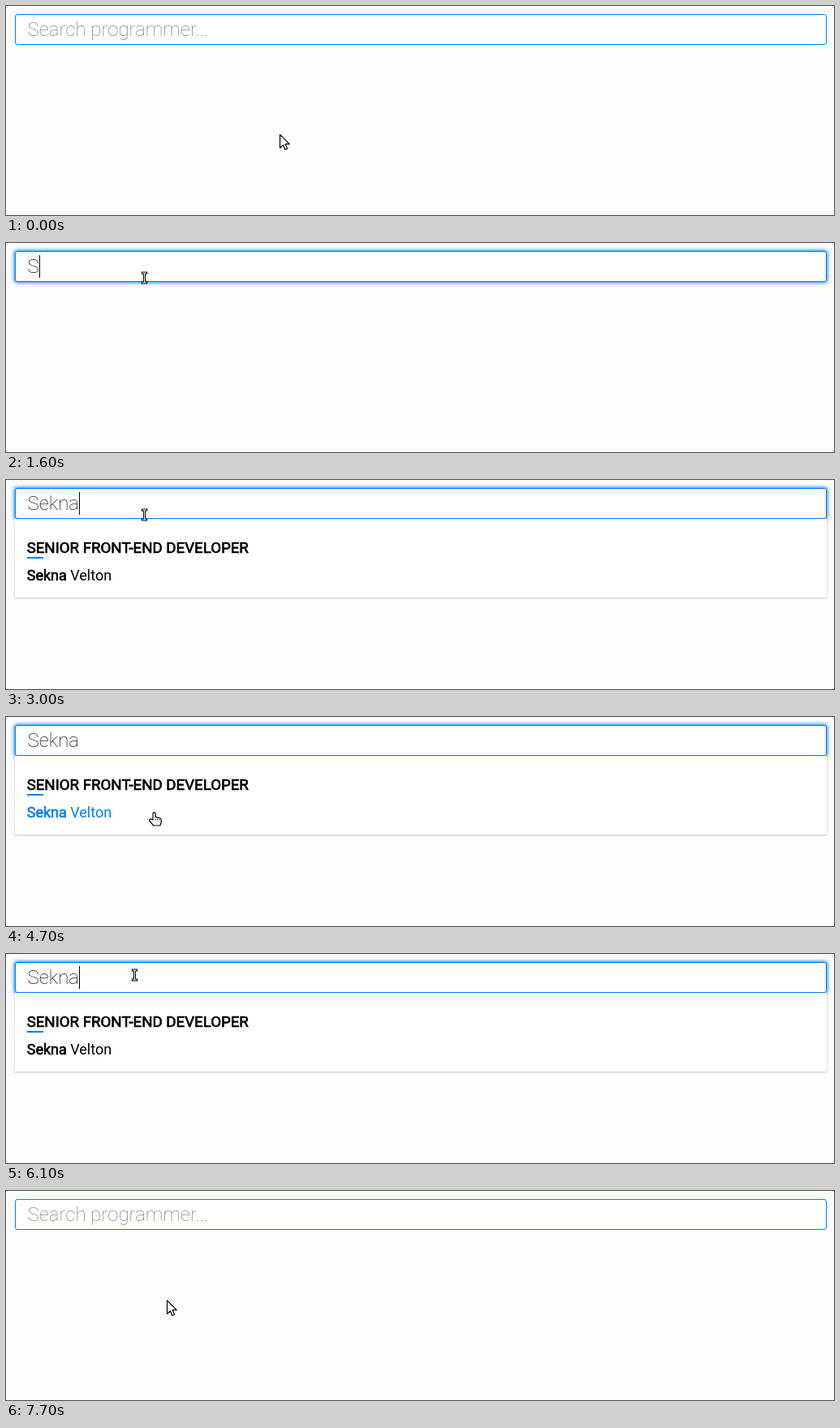
An HTML page that plays this animation: 1020x258 px, repeating every 8 s.

```html
<!DOCTYPE html>
<html lang="en">
<head>
<meta charset="utf-8">
<title>Programmer search</title>
<style>
  html, body { margin: 0; width: 100%; height: 100%; overflow: hidden; background: #fdfdfb; }
  #stage { position: relative; width: 1020px; height: 258px; overflow: hidden; }
  #field, #panel { position: absolute; left: 11px; width: 1000px; box-sizing: border-box; background: #fff; }
  #field { top: 10px; height: 38px; border: 1px solid #0081f0; border-radius: 3px; }
  #field.focus { box-shadow: 0 0 4px 1px #0081ff; }
  #panel { top: 48px; box-shadow: 0 1px 3px rgba(0, 0, 0, .22); }
  svg { position: absolute; left: 0; top: 0; }
  text { font-family: Roboto, sans-serif; font-size: 18px; fill: currentColor; white-space: pre; }
  #value { font-size: 24px; font-weight: 100; }
  .title { font-size: 14pt; }
  .title, .match { stroke: currentColor; stroke-width: .7px; }
  .hover { color: #0081f0; }
  .cursor { fill: #fff; stroke: #000; stroke-width: 1.2px; stroke-linejoin: round; }
</style>
</head>
<body>
<div id="stage">
  <div id="field"></div>
  <div id="panel"></div>
  <svg width="1020" height="258" viewBox="0 0 1020 258">
    <text id="value" x="26.5" y="37"></text>
    <rect id="caret" y="15" width="1" height="28"/>
    <g id="results"></g>
    <g id="pointer">
      <path id="arrow" class="cursor" d="M.5 .7V17.2L4.4 13.6L6.8 19.2L9.6 18L7.2 12.4H12.2Z"/>
      <g id="beam" fill="none">
        <path stroke="#000" stroke-width="3" d="M-3.7-6H3.7M-3.7 6H3.7M0-6V6"/>
        <path stroke="#fff" d="M-2.7-6H2.7M-2.7 6H2.7M0-6V6"/>
      </g>
      <g id="hand" transform="translate(-6 -1)">
        <path class="cursor" d="M5 10V2.5Q5 .8 6.6 .8T8.2 2.5V6.6L13 7.6Q15.2 8 15.2 10V13L13.8 17H5.8L.9 11.4Q0 9.2 2 8.9Z"/>
        <path stroke="#000" d="M8.3 9v1.5M10.6 9v1.5M12.9 9v1.5"/>
      </g>
    </g>
  </svg>
</div>
<script>
const LOOP = 8000, STEP = 100, ROW = 104, BLINK = 600, DELAY = 100;
const FOCUS = 800, PICK = 4800, REFOCUS = 6100, CLEARED = 7100, BLUR = 7700;
const TYPE = { start: 1600, every: 325 }, ERASE = { start: 6500, every: 100 };
const $ = id => document.getElementById(id);

const people = [
  ['SENIOR FRONT-END DEVELOPER', 'Sekna Velton'],
  ['JUNIOR BACK-END DEVELOPER', 'Selvo Mordan'],
];
const name = people[0][1].split(' ')[0];

const home = { x: 337, y: 158 };
const moves = [
  { from: 100, to: 900, x: 149, y: 41 },
  { from: 1000, to: 1100, x: 170.5, y: 43 },
  { from: 3400, to: 4100, x: 182, y: 118 },
  { from: 4700, to: 5500, x: 158.5, y: 26 },
  { from: 6100, to: 7000, x: 118, y: 42 },
  { from: 7000, to: 7500, x: 198, y: 134.5 },
];

const clamp = (v, lo, hi) => Math.min(hi, Math.max(lo, v));
const show = (el, on) => { el.style.display = on ? '' : 'none'; };

// Number of keys pressed so far in a run, and the time of the last one
const presses = (run, t) => clamp(Math.floor((t - run.start) / run.every) + 1, 0, name.length);
const lastPress = (run, t) => {
  const n = presses(run, t);
  return n ? Math.ceil((run.start + (n - 1) * run.every) / STEP) * STEP : 0;
};

const isFocused = t => (t >= FOCUS && t < PICK) || (t >= REFOCUS && t < BLUR);

function caretVisible(t) {
  const since = Math.max(t < REFOCUS ? FOCUS : REFOCUS, lastPress(TYPE, t), lastPress(ERASE, t));
  return isFocused(t) && Math.floor((t - since) / BLINK) % 2 === 0;
}

function pointerAt(t) {
  return moves.reduce((pos, m) => {
    const p = clamp((t - m.from) / (m.to - m.from), 0, 1);
    const e = p * p * (3 - 2 * p);
    return { x: pos.x + (m.x - pos.x) * e, y: pos.y + (m.y - pos.y) * e };
  }, home);
}

function entry([title, person], i, count, hover) {
  return `<g transform="translate(0 ${i * ROW})">
    <text class="title" x="25.7" y="90">${title}</text>
    <rect x="26" y="95" width="20" height="2" fill="#0081f0"/>
    <text class="${hover ? 'hover' : ''}" x="25.7" y="124"><tspan class="match">${
      person.slice(0, count)}</tspan>${person.slice(count)}</text></g>`;
}

let drawn = -1;
function render(now) {
  requestAnimationFrame(render);
  const t = Math.floor(now % LOOP / STEP) * STEP;
  if (t === drawn) return;
  drawn = t;

  const letters = presses(TYPE, t) - presses(ERASE, t);
  const count = t < CLEARED ? presses(TYPE, t - DELAY) : 0;
  const { x, y } = pointerAt(t);
  const hover = count > 0 && y > 104 && y < 132;

  $('field').classList.toggle('focus', isFocused(t));
  $('value').textContent = letters ? name.slice(0, letters) : 'Search programmer...';
  $('value').style.color = letters ? '#000' : '#757575';
  const width = letters ? $('value').getComputedTextLength() : 0;
  $('caret').setAttribute('x', Math.round(27 + width));
  show($('caret'), caretVisible(t));

  const found = count ? people.filter(p => p[1].startsWith(name.slice(0, count))) : [];
  show($('panel'), count);
  $('panel').style.height = 97 + (found.length - 1) * ROW + 'px';
  $('results').innerHTML = found.map((p, i) => entry(p, i, count, hover && !i)).join('');

  const shape = y < 48 ? 'beam' : hover ? 'hand' : 'arrow';
  for (const id of ['arrow', 'beam', 'hand']) show($(id), id === shape);
  $('pointer').setAttribute('transform', `translate(${x} ${y})`);
}
render(0);
</script>
</body>
</html>
```
